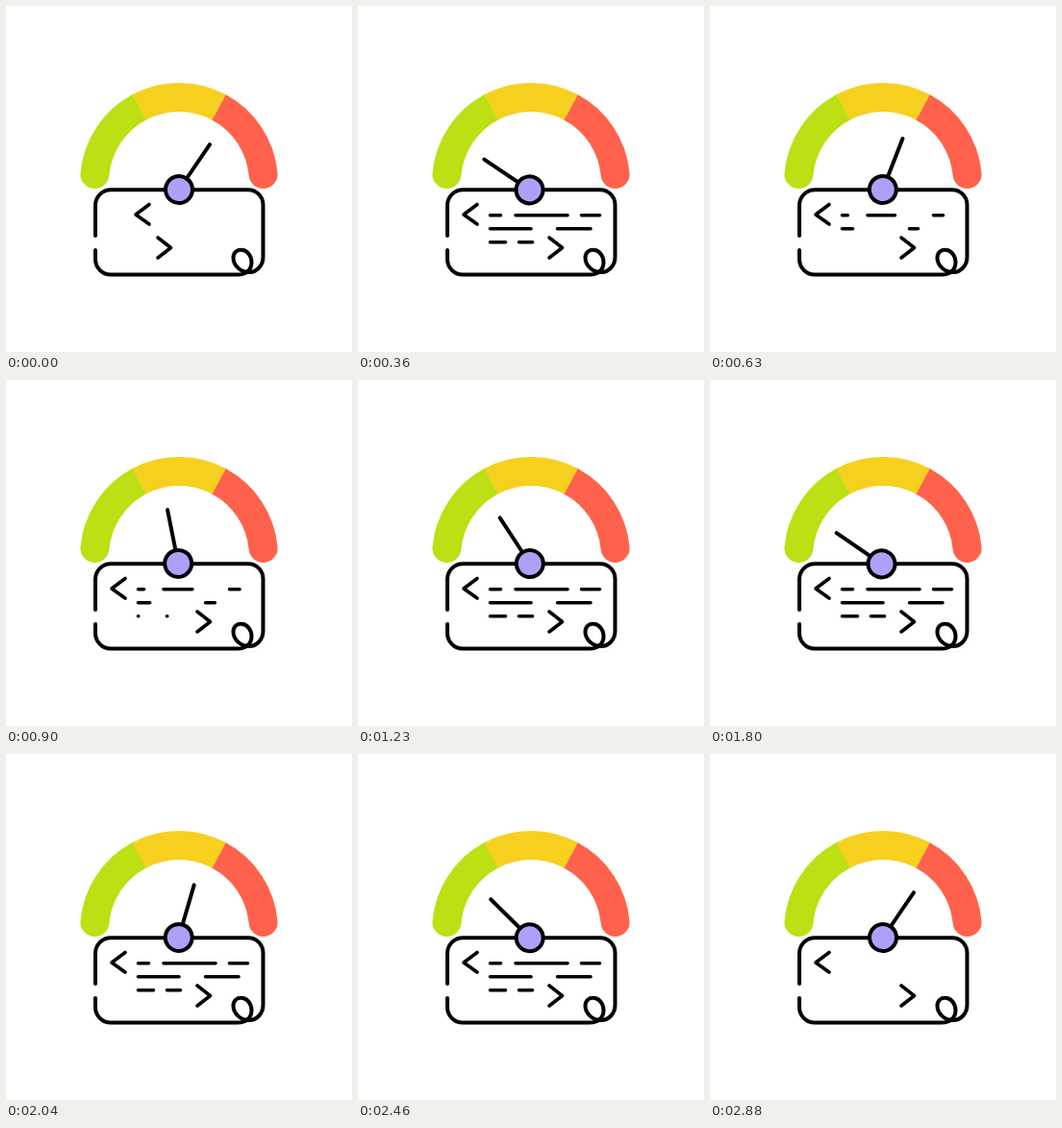
An HTML page for the animation above (2910 ms loop, 360 by 360 pixels).

```html
<!DOCTYPE html>
<html>
<head>
<meta charset="utf-8">
<style>
html, body { margin: 0; width: 100%; height: 100%; overflow: hidden; background: #fff; }
svg { display: block; width: 100vw; height: 100vh; }
path { fill: none; stroke: #000; stroke-width: 3.6; stroke-linecap: round; stroke-linejoin: round; }
.band { stroke-width: 30; }
.thick { stroke-width: 4; }
</style>
</head>
<body>
<svg viewBox="0 0 360 360">
  <path class="band" stroke="#000" style="stroke:#bbe014" d="M92.4 175A88 88 0 0 1 138.3 105.5"/>
  <path class="band" style="stroke:#ff624c" d="M267.6 175A88 88 0 0 0 221.7 105.5"/>
  <path class="band" style="stroke:#f7d01f;stroke-linecap:butt" d="M138.3 105.5A88 88 0 0 1 221.7 105.5"/>
  <path class="thick" d="M93 239V207A16 16 0 0 1 109 191.3H252A15.5 15.5 0 0 1 267.5 207V261
    C267.5 271 260 277 253 277C243 277 236.5 269 236.5 262C236.5 256 241 253.5 245 253.8
    C251 254 255.5 260 255.5 267C255.5 275 249 279.6 241 279.6H109A16 16 0 0 1 93 263.6V254"/>
  <g id="code"></g>
  <path id="open" d="M124 206.5L110 217L124 227"/>
  <path id="close" d="M199 241L212.5 251.5L199 262"/>
  <g id="needle">
    <path class="thick" d="M0 0V-58"/>
    <circle cy="-1.1" r="14" fill="#af9ff9" stroke="#000" stroke-width="4"/>
  </g>
</svg>
<script>
const LOOP = 2910, LOW = -56, HIGH = 34.2;
const $ = id => document.getElementById(id);
const clamp = x => Math.min(1, Math.max(0, x));
const ramp = (t, start, length) => clamp((t - start) / length);
const ease = x => (1 - Math.cos(Math.PI * x)) / 2;

// The needle turns back at each of these times, starting from the high end.
const turns = [0, 360, 720, 1080, 1530, 1815, 2135, 2555, 2880, LOOP];

// Dashes of code: row, left, right
const dashes = [
  [0, 137.5, 148.5], [0, 164, 218], [0, 232.5, 251.5],
  [1, 137.5, 180], [1, 207.5, 242],
  [2, 137.5, 153.5], [2, 167.5, 181.5]
].map(([row, left, right]) => {
  const el = document.createElementNS('http://www.w3.org/2000/svg', 'path');
  $('code').append(el);
  return { el, row, left, right };
});

function needleAngle(t) {
  if (t >= 2880) return HIGH;
  const i = turns.findIndex(x => x > t) - 1;
  const p = ease(ramp(t, turns[i], turns[i + 1] - turns[i]));
  return HIGH + (LOW - HIGH) * (i % 2 ? 1 - p : p);
}

function rowLength(t, row) {
  const back = 2 - row;
  return ramp(t, 30 + row * 60, 200) - ramp(t, 480 + back * 40, 150)
    + ramp(t, 746 + row * 75, 280) - ramp(t, 2560 + back * 60, 160);
}

function draw(t) {
  $('needle').setAttribute('transform', `translate(179.4 192) rotate(${needleAngle(t)})`);
  const gather = 1 - ease(ramp(t, 0, 220));
  $('open').setAttribute('transform', `translate(${25 * gather} 0)`);
  $('close').setAttribute('transform', `translate(${-41 * gather} 0)`);
  for (const { el, row, left, right } of dashes) {
    const p = rowLength(t, row);
    const y = 217.7 + 14 * row;
    el.setAttribute('d', p > 0.001 ? `M${left} ${y}h${(right - left) * p}` : '');
  }
}

const begin = performance.now();
function tick() {
  draw((performance.now() - begin) % LOOP);
  requestAnimationFrame(tick);
}
tick();
</script>
</body>
</html>
```
